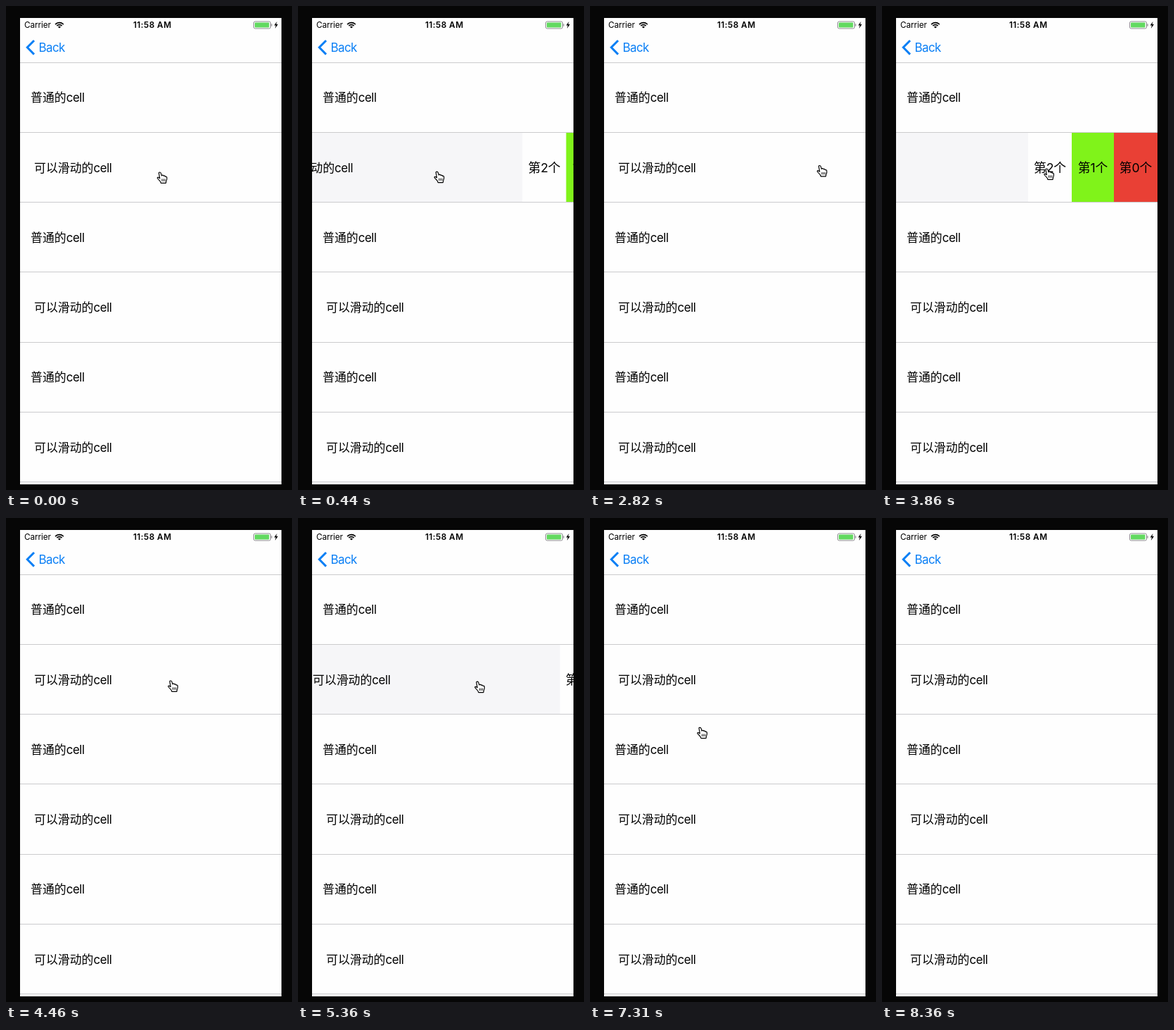
Animation, 407 px wide and 687 px high, one loop 9260 ms. Source, as an HTML page with a canvas:

```html
<!DOCTYPE html>
<html lang="zh-CN">
<head>
<meta charset="utf-8">
<title>Swipe cell</title>
<style>
html, body { margin: 0; width: 100%; height: 100%; overflow: hidden; background: #060606; }
canvas { display: block; width: 407px; height: 687px; }
</style>
</head>
<body>
<canvas id="stage"></canvas>
<script>
const W = 407, H = 687, LOOP = 9260;
const LEFT = 20, TOP = 17, RIGHT = 392, BOTTOM = 679;
const ROWS = 6, LIST_TOP = 80, PITCH = 99.25, OPEN = 184;
const LATIN = 'Inter, "Noto Sans CJK SC", "Noto Sans CJK", sans-serif';
const HAN = '"Noto Sans CJK SC", "Noto Sans CJK", sans-serif';
const BLUE = '#0a7ff5';

const canvas = document.getElementById('stage');
const ratio = window.devicePixelRatio || 1;
canvas.width = W * ratio;
canvas.height = H * ratio;
const ctx = canvas.getContext('2d');
ctx.scale(ratio, ratio);

const tickAt = t => Math.max(0, Math.floor((t - 120) / 149.5) + 1);
const progress = (tick, from, to) => Math.min(1, Math.max(0, (tick - from) / (to - from)));
const easeInOut = p => p * p * (3 - 2 * p);
const easeOut = p => 1 - (1 - p) ** 3;

const handStart = { x: 222, y: 244 };
const handMoves = [
  { from: 0, to: 7, x: 172.5, y: 242 },
  { from: 7, to: 9, x: 264.5, y: 241.5 },
  { from: 9, to: 14, x: 368, y: 235 },
  { from: 16, to: 19, x: 330, y: 234.5 },
  { from: 20, to: 24, x: 178, y: 240 },
  { from: 24, to: 26, x: 237.5, y: 239 },
  { from: 30, to: 34, x: 300, y: 240 },
  { from: 35, to: 40, x: 92, y: 241 },
  { from: 40, to: 41, x: 123.5, y: 240.5 },
  { from: 48, to: 55, x: 376, y: 694 }
];
const swipes = [
  { open: [0, 7], close: [16, 17] },
  { open: [20, 25], close: [28, 30] },
  { open: [35, 40], close: [43, 45] }
];
const buttons = [
  { text: '第2个', width: 62, color: '#fefefe' },
  { text: '第1个', width: 60, color: '#80f31a' },
  { text: '第0个', width: 62, color: '#e94035' }
];

const handShape = new Path2D(
  'M3 2Q3 .7 4.4 .8Q5.6 .9 6 2.2L7 5.6Q7.6 4.6 9 5Q9.6 5.3 9.8 6' +
  'Q11 5.2 12 6.4L12.2 7Q14 6.4 14.4 8.2Q14.8 11 13.6 13L13 16.2L6 16.2' +
  'Q5.6 14 3.6 12.2Q1 9.8 .8 8.8Q1 7.6 2.4 8.2L4.3 9.4Z');
const handCreases = new Path2D('M7.5 10.2V13.6M9.6 10.2V13.6M11.7 10.2V13.6');
const bolt = new Path2D('M385.6 22L381.6 27.6H384L382.8 32L387 26.1H384.5Z');

function handAt(tick) {
  let { x, y } = handStart;
  for (const move of handMoves) {
    const p = progress(tick, move.from, move.to);
    x += (move.x - x) * p;
    y += (move.y - y) * p;
  }
  return { x, y };
}

function slideAt(tick) {
  return OPEN * swipes.reduce((sum, { open, close }) =>
    sum + easeInOut(progress(tick, ...open)) - easeOut(progress(tick, ...close)), 0);
}

function rect(x, y, w, h, color) {
  ctx.fillStyle = color;
  ctx.fillRect(x, y, w, h);
}

function setType(size, family, spacing, weight = 400) {
  ctx.font = `${weight} ${size}px ${family}`;
  ctx.letterSpacing = spacing + 'px';
}

// Draws Chinese and Latin runs in their own fonts.
function label(text, x, y, size, centered) {
  const runs = text.match(/[\x20-\x7e]+|[^\x20-\x7e]+/g);
  const pick = run => /[\x20-\x7e]/.test(run)
    ? setType(size, LATIN, -0.4) : setType(size, HAN, 0);
  const widths = runs.map(run => (pick(run), ctx.measureText(run).width));
  if (centered) x -= widths.reduce((a, b) => a + b) / 2;
  ctx.fillStyle = '#000';
  ctx.textAlign = 'left';
  runs.forEach((run, i) => {
    pick(run);
    ctx.fillText(run, x, y);
    x += widths[i];
  });
}

function drawWifi() {
  const x = 76, y = 31.6, half = 0.82;
  ctx.strokeStyle = '#000';
  ctx.lineWidth = 1.7;
  for (const r of [5, 8]) {
    ctx.beginPath();
    ctx.arc(x, y, r, -Math.PI / 2 - half, -Math.PI / 2 + half);
    ctx.stroke();
  }
  ctx.fillStyle = '#000';
  ctx.beginPath();
  ctx.moveTo(x, y);
  ctx.arc(x, y, 2.8, -Math.PI / 2 - half, -Math.PI / 2 + half);
  ctx.fill();
}

function drawBattery() {
  ctx.strokeStyle = '#8d8d8f';
  ctx.lineWidth = 1;
  ctx.beginPath();
  ctx.roundRect(352.5, 22, 24, 10, 2);
  ctx.stroke();
  ctx.fillStyle = '#62d960';
  ctx.beginPath();
  ctx.roundRect(354, 23.5, 20.5, 7, 0.8);
  ctx.fill();
  rect(377.4, 25.3, 1.2, 3.4, '#8d8d8f');
  ctx.fillStyle = '#000';
  ctx.fill(bolt);
}

function drawHeader() {
  ctx.fillStyle = '#000';
  ctx.textAlign = 'left';
  setType(11.8, LATIN, -0.1);
  ctx.fillText('Carrier', 26, 31.4);
  ctx.textAlign = 'center';
  setType(11.8, LATIN, 0.45, 600);
  ctx.fillText('11:58 AM', 208.2, 31.4);
  drawWifi();
  drawBattery();

  ctx.strokeStyle = BLUE;
  ctx.lineWidth = 3;
  ctx.beginPath();
  ctx.moveTo(40, 49);
  ctx.lineTo(30.3, 58.8);
  ctx.lineTo(40, 68.6);
  ctx.stroke();
  ctx.fillStyle = BLUE;
  ctx.textAlign = 'left';
  setType(17, LATIN, -0.6);
  ctx.fillText('Back', 46.5, 65);
}

function drawButtons(slide, top, baseline) {
  let x = RIGHT - slide;
  for (const { text, width, color } of buttons) {
    rect(x, top, width, PITCH - 1, color);
    label(text, x + width / 2, baseline, 17.8, true);
    x += width;
  }
}

function drawRow(i, slide) {
  const top = Math.floor(LIST_TOP + i * PITCH);
  const baseline = Math.round(LIST_TOP + i * PITCH + 56.3);
  const swipeable = i % 2 === 1;
  if (slide > 0) rect(LEFT, top + 1, RIGHT - LEFT - slide, PITCH - 1, '#f6f6f8');
  label(swipeable ? '可以滑动的cell' : '普通的cell',
    (swipeable ? 40 : 35) - slide, baseline, 16.9);
  if (slide > 0) drawButtons(slide, top + 1, baseline);
}

function drawHand({ x, y }) {
  ctx.save();
  ctx.translate(x - 7.5, y - 8.8);
  ctx.lineJoin = 'round';
  ctx.fillStyle = '#fff';
  ctx.fill(handShape);
  ctx.strokeStyle = '#000';
  ctx.lineWidth = 1.2;
  ctx.stroke(handShape);
  ctx.lineWidth = 0.9;
  ctx.stroke(handCreases);
  ctx.restore();
}

function draw(t) {
  const tick = tickAt(t);
  rect(0, 0, W, H, '#060606');
  ctx.save();
  ctx.beginPath();
  ctx.rect(LEFT, TOP, RIGHT - LEFT, BOTTOM - TOP);
  ctx.clip();
  rect(LEFT, TOP, RIGHT - LEFT, BOTTOM - TOP, '#fefefe');
  drawHeader();
  for (let i = 0; i < ROWS; i++) drawRow(i, i === 1 ? slideAt(tick) : 0);
  for (let i = 0; i <= ROWS; i++) {
    rect(LEFT, Math.floor(LIST_TOP + i * PITCH), RIGHT - LEFT, 1, '#cbcbcd');
  }
  ctx.restore();
  if (tick < 56) drawHand(handAt(tick));
}

function loop() {
  draw(performance.now() % LOOP);
  requestAnimationFrame(loop);
}
loop();
</script>
</body>
</html>
```
